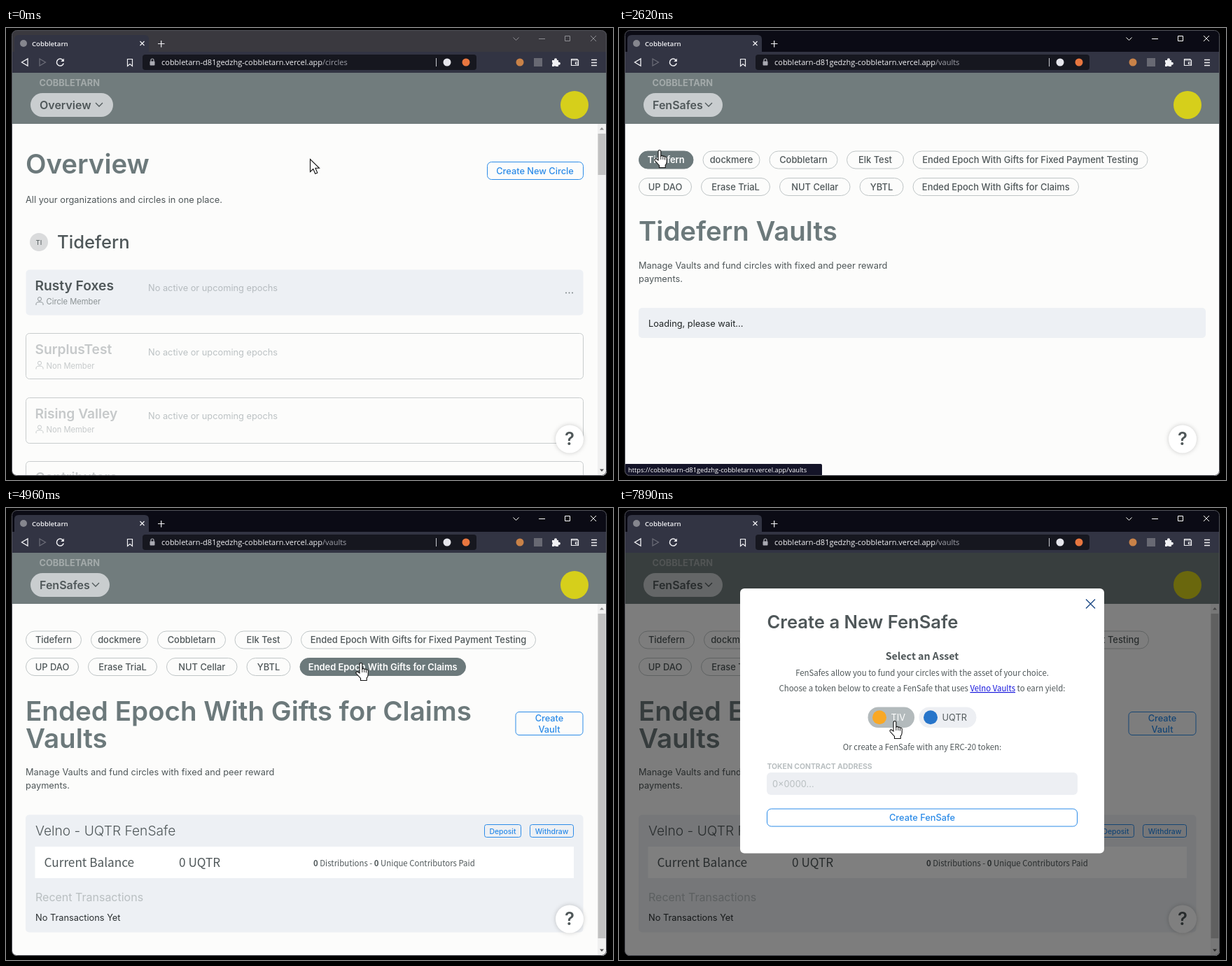
An HTML page for the animation above (8000 ms loop, 867 by 646 pixels).

```html
<!DOCTYPE html>
<html lang="en">
<head>
<meta charset="utf-8">
<title>Vault walkthrough</title>
<style>
  html, body { margin: 0; width: 100%; height: 100%; overflow: hidden; background: #000; }
  svg { display: block; width: 867px; height: 646px; font-optical-sizing: none; }
  text { font-family: Inter, sans-serif; white-space: pre; }
  .ui { font-family: "Open Sans", sans-serif; }
  .sans { font-family: "Noto Sans CJK SC", "Noto Sans CJK JP", "Noto Sans CJK", "Open Sans", sans-serif; }
  .mid { text-anchor: middle; }
  .menu { filter: drop-shadow(0 0 28px rgba(0, 0, 0, .3)); }
  .help { filter: drop-shadow(0 0 3px rgba(0, 0, 0, .2)); }
</style>
</head>
<body>
<svg id="stage" viewBox="0 0 867 646"></svg>
<script>
const LOOP = 8000;
const INK = '#4f5759', SLATE = '#6c797b', PALE = '#b9bfc1', BLUE = '#2b8be8', PANEL = '#edf0f4', PAGE = '#fcfcfb';
const HOST = 'cobbletarn-d81gedzhg-cobbletarn.vercel.app';

// time, x, y, hand pointer
const CURSOR = [
  [0, 434, 187], [290, 434, 188], [570, 434, 189], [1150, 167, 120], [1440, 119, 104, 1],
  [2020, 49, 175, 1], [2320, 49, 174, 1], [2620, 49, 174, 1], [2910, 206, 183], [3210, 370, 222, 1],
  [3510, 489, 232, 1], [3810, 491, 228, 1], [4090, 493, 225, 1], [4680, 493, 225, 1],
  [4960, 498, 221, 1], [5260, 556, 262], [5560, 757, 307, 1], [5840, 766, 311, 1],
  [6150, 765, 306, 1], [6430, 769, 306], [6730, 769, 306], [7010, 685, 312],
  [7310, 385, 304, 1], [7610, 385, 304, 1], [7890, 385, 304, 1]
];

const MENU = [
  ['TIDEFERN', 'Rusty Foxes'], ['DOCKMERE', 'dockmere'], ['COBBLETARN', 'Community', 'Core'],
  ['ELK TEST', 'Elks', 'Circle 2', 'Test'],
  ['ENDED EPOCH WITH GIFTS FOR FIXED PAYMENT TESTING', 'Basketry'], ['UP DAO', 'Quiet Maple Capital']
];

const text = (x, y, s, size = 12.8, fill = INK, weight = 400, cls = '') =>
  `<text x="${x}" y="${y}" font-size="${size}" fill="${fill}" font-weight="${weight}" class="${cls}">${s}</text>`;
const rect = (x, y, w, h, r = 0, fill = 'none', stroke = 'none') =>
  `<rect x="${x}" y="${y}" width="${w}" height="${h}" rx="${r}" fill="${fill}" stroke="${stroke}"/>`;
const circle = (x, y, r, fill) => `<circle cx="${x}" cy="${y}" r="${r}" fill="${fill}"/>`;
const path = (d, stroke, width = 1, fill = 'none') =>
  `<path d="${d}" stroke="${stroke}" stroke-width="${width}" fill="${fill}"/>`;
const group = (cls, content) => `<g class="${cls}">${content}</g>`;

function scrollbar(x, top, thumbTop, thumbEnd) {
  return rect(x, top, 13, 640 - top, 0, '#f0f0f0') + rect(x + .5, thumbTop, 11, thumbEnd - thumbTop, 0, '#c1c1c1') +
    path(`M${x + 3} ${top + 8.5}l3-3.5 3 3.5z`, 'none', 0, '#8b8b8b') +
    path(`M${x + 3} 630.5l3 3.5 3-3.5z`, 'none', 0, '#505050');
}

function chrome(focused, route) {
  const ctl = focused ? '#fff' : '#8e8e93', white = '#f1f1f4';
  return rect(8, 3, 850, 31, 0, focused ? '#0b0b15' : '#3a393f') +
    path('M12 35V16q0-6 6-6H198q6 0 6 6V35z', 'none', 0, '#323443') + rect(8, 34, 850, 30, 0, '#323443') +
    circle(25, 22, 5, '#85868e') + text(37, 26, 'Cobbletarn', 9.6, white, 600, 'ui') +
    path('M191.5 19l6 6m0-6l-6 6M217 22.5h9.5M221.7 18v9.5', white, 1.2) +
    path('M724.5 13.500l4 4 4-4M761 15.500h9M798.500 11.500h7v7h-7zM835 11l8 8m0-8l-8 8', ctl) +
    path('M31 44v10l-8.5-5z', white, 1.3) + path('M48 44v10l8.5-5z', '#6d6e79', 1.2) +
    path('M81.5 46.2a5 5 0 1 0 .7 4.3', white, 1.5) + path('M82.8 43.5v4.5h-4.5z', 'none', 0, white) +
    path('M173.5 44.5h7v10l-3.5-3-3.5 3z', white, 1.2) +
    rect(195, 38, 477, 22, 4, '#16171f') +
    rect(205.5, 47.5, 7, 6, 1, '#a9aab2') + path('M207 48v-2a2 2 0 0 1 4 0v2', '#a9aab2', 1.2) +
    text(222, 53, `${HOST}<tspan fill="#a0a1aa">${route}</tspan>`, 11, white, 400, 'ui') +
    path('M614.5 43v12', '#c9c9d0') + circle(630, 49, 5.5, '#e6e6ec') + circle(657, 49, 5.5, '#e8763f') +
    circle(734, 49, 5.5, '#c98248') + rect(754, 43, 12, 12, 0, '#686973') +
    path('M780 46h3.2a2 2 0 1 1 3.6 0H789v3a2 2 0 1 1 0 3.6V55h-3.5a1.800 1.800 0 0 0-3 0H780v-3a1.800 1.800 0 0 0 0-3z', 'none', 0, white) +
    path('M816 46v-1.5h-8.5v9h10v-7.5h-10M817.5 49h-4v2.5h4', white, 1.2) +
    path('M836 45.5h8M836 49.5h8M836 53.5h8', white, 1.3);
}

function header(label, labelWidth, inset) {
  const chevron = 48 + labelWidth + 5;
  return rect(8, 64, 850 - inset, 73, 0, '#717c7d') +
    text(47.5, 83, 'COBBLETARN', 12.8, '#a3aaaa', 700) +
    rect(35, 93, labelWidth + 43, 34, 17, '#c9cdcf') + text(48, 115.5, label, 16, INK, 600) +
    path(`M${chevron} 107l5 5 5-5`, INK, 1.3) + circle(812 - inset, 110, 20, '#d6cf1b');
}

const help = inset => group('help', circle(805 - inset, 587.5, 20, '#fff')) +
  text(805 - inset, 596, '?', 25.6, INK, 600, 'mid');

function circleCard(i, name, inset) {
  const y = 345 + i * 91.6, first = i === 0, tone = first ? '#8b9294' : '#c6cacb';
  return rect(28.5, Math.floor(y) + .5, 796 - inset, 65, 5, first ? PANEL : 'none', first ? 'none' : '#c8cccd') +
    text(41.5, y + 29.5, name, 19.2, first ? INK : '#c6c9ca', 600) +
    path(`M43 ${y + 51}v-1.5q0-3 5-3t5 3V${y + 51}`, tone) +
    `<circle cx="48" cy="${y + 42.3}" r="2.6" fill="none" stroke="${tone}"/>` +
    text(57.5, y + 50, first ? 'Circle Member' : 'Non Member', 11.2, tone) +
    text(203 - inset * .2, y + 31, 'No active or upcoming epochs', 12.8, first ? '#b5bbbf' : '#bcc2c4') +
    (first ? [0, 4.5, 9].map(dx => circle(800 - inset + dx, y + 33.5, 1, '#7b8587')).join('') : '');
}

function overviewPage(inset) {
  return rect(8, 64, 850, 576, 0, PAGE) + header('Overview', 75, inset) +
    text(28, 208, 'Overview', 38.4, SLATE, 600) +
    rect(687.5 - inset, 191.5, 137, 25, 6, 'none', BLUE) +
    text(755.5 - inset, 208.5, 'Create New Circle', 12.8, BLUE, 500, 'mid') +
    text(28, 250, 'All your organizations and circles in one place.') +
    circle(47, 306, 13, '#dadbdc') + text(47, 309.5, 'TI', 9.6, INK, 400, 'mid') +
    text(73, 315, 'Tidefern', 25.6, INK, 500) +
    ['Rusty Foxes', 'SurplusTest', 'Rising Valley', 'Contributors'].map((n, i) => circleCard(i, n, inset)).join('') +
    help(inset) + scrollbar(845 - inset, 137, 151, 210) + (inset ? scrollbar(845, 64, 78, 467) : '');
}

function menu(t) {
  let y = 199;
  const sections = MENU.map(([title, ...items]) => {
    const part = path(`M48 ${Math.floor(y) + .5}H344`, '#d9dcdd') + text(48, y + 17.8, title, 10.4, PALE, 700) +
      items.map((s, i) => text(48, y + 42 + i * 26.4, s, 16)).join('');
    y += 59.6 + 26.4 * (items.length - 1);
    return part;
  });
  const late = t >= 2320;
  return group('menu', rect(35, 81, 322, 620, 6, '#fff')) +
    text(48, 115.5, 'Overview', 16, INK, 600) + path('M127.5 113l5-5 5 5', INK, 1.3) +
    text(48, 154.8, 'Overview', 16, t >= 2020 && !late ? BLUE : INK) +
    text(48, 181.3, 'FenSafes', 16, late ? BLUE : INK) + sections.join('') + path('M48 635.5H344', '#d9dcdd');
}

function pill(label, x, y, width, active) {
  return rect(x + .5, y, width - 1, 25, 12.5, active ? SLATE : 'none', active ? SLATE : '#bfc5c6') +
    text(x + width / 2, y + 17.3, label, 12.9, active ? '#fff' : INK, active ? 600 : 500, 'mid');
}

function pills(t, loaded) {
  const dx = loaded ? 1.5 : 0, claims = 'Ended Epoch With Gifts for Claims';
  return pill('Tidefern', 28, 176, 78.5 + dx, !loaded) +
    pill('dockmere', 119.5 + dx, 176, 82) + pill('Cobbletarn', 214.5 + dx, 176, 98) +
    pill('Elk Test', 325 + dx, 176, 82) +
    pill('Ended Epoch With Gifts for Fixed Payment Testing', 419.5 + dx, 176, 336) +
    pill('UP DAO', 28, 214.5, 76) + pill('Erase TriaL', 117, 214.5, 99) +
    pill('NUT Cellar', 229, 214.5, 101.5) + pill('YBTL', 343.5, 214.5, 63, t >= 3210 && t < 3510) +
    pill(claims, 419.5, 214.5, t < 6430 ? 237.5 : 236, t >= 3510);
}

const blurb = y => text(28, y, 'Manage Vaults and fund circles with fixed and peer reward') + text(28, y + 19.2, 'payments.');

function smallButton(label, x, width) {
  return rect(x + .5, 452.5, width - 1, 18, 3, 'none', BLUE) +
    text(x + width / 2, 465.5, label, 10.4, BLUE, 500, 'mid');
}

function vaultCard(t) {
  const solid = t >= 5560 && t < 6730, ink = solid ? '#fff' : BLUE, weight = solid ? 600 : 500;
  return text(28, 304, 'Ended Epoch With Gifts for Claims', 38.6, SLATE, 600) +
    text(28, 342.5, 'Vaults', 38.6, SLATE, 600) + blurb(382) +
    rect(728, 291.5, 96, 33, 5, solid ? '#2b90f0' : 'none', BLUE) +
    text(776, 304.5, 'Create', 12.8, ink, weight, 'mid') + text(776, 320.5, 'Vault', 12.8, ink, weight, 'mid') +
    rect(28, 438.5, 796.5, 168, 5, PANEL) + text(42, 468, 'Velno - UQTR FenSafe', 19.2, INK, 300) +
    (t >= 4960 ? smallButton('Deposit', 683, 53) + smallButton('Withdraw', 748, 63) : '') +
    rect(41.5, 484, 769.5, 45, 0, '#fff') + text(54.5, 513, 'Current Balance', 17.2, INK, 400, 'sans') +
    text(247, 513, '0 UQTR', 17.2, INK, 400, 'sans') +
    text(439, 511.5, '<tspan font-weight="700">0</tspan> Distributions - <tspan font-weight="700">0</tspan> Unique Contributors Paid', 11.4, INK, 400, 'sans') +
    text(42, 562, 'Recent Transactions', 16, PALE) + text(42, 590, 'No Transactions Yet', 12.8, '#2a2f31') +
    scrollbar(845, 137, 151, 615);
}

function vaultsPage(t) {
  const loaded = t >= 4680;
  return rect(8, 64, 850, 576, 0, PAGE) + header('FenSafes', 70, 0) + pills(t, loaded) +
    (loaded ? vaultCard(t) :
      text(28, 304, 'Tidefern Vaults', 38.4, SLATE, 600) + blurb(344) +
      rect(28, 400, 810, 43, 5, PANEL) + text(42, 426.5, 'Loading, please wait...', 12.8, '#1f2425')) +
    help(0) +
    (t < 3210 ? `<g opacity="${t < 2910 ? 1 : .5}">` + rect(8, 623, 282, 18, 2, '#141428') +
      text(13, 635, `https://${HOST}/vaults`, 9.3, '#fff', 400, 'ui') + '</g>' : '');
}

function asset(label, x, width, color, fill = '#edeff3', ink = '#555d5f') {
  return rect(x, 284.5, width, 29.5, 14.75, fill) + circle(x + 16.5, 299.3, 10, color) +
    text(x + 33, 304, label, 12.8, ink);
}

function dialog(t) {
  const ready = t >= 7890, line = ready ? BLUE : '#9dd0f8';
  const hover = t >= 7610 ? ['#b3babc', '#fff'] : t >= 7310 ? ['#cfd4d7', '#fff'] : [];
  const row = (y, s) => text(433, y, s, 11.4, INK, 400, 'sans mid');
  return rect(8, 64, 850, 576, 0, '#00000080') + rect(173, 115, 520, 378.5, 6, '#fff') +
    path('M667 130.5l13 13m0-13l-13 13', ready ? '#1d4a86' : INK, 1.4) +
    text(211.5, 172, 'Create a New FenSafe', 25.6, INK, 600) +
    text(433, 216.5, 'Select an Asset', 14.2, INK, 600, 'sans mid') +
    row(240, 'FenSafes allow you to fund your circles with the asset of your choice.') +
    row(262, 'Choose a token below to create a FenSafe that uses <tspan fill="#1414dc" text-decoration="underline">Velno Vaults</tspan> to earn yield:') +
    asset('TIV', 355.5, 66.5, '#f9a825', ...hover) + asset('UQTR', 428.5, 82, '#2775ca') +
    row(346, 'Or create a FenSafe with any ERC-20 token:') +
    text(211.5, 373, 'TOKEN CONTRACT ADDRESS', 10.4, PALE, 700) +
    rect(211, 378, 444, 32, 6, '#edeff3') + text(219, 399, '0×0000...', 12.8, PALE) +
    rect(211.5, 430, 443, 25, 6, '#fff', line) + text(433, 447.2, 'Create FenSafe', 12.8, line, 500, 'mid');
}

function pointer([, x, y, hand]) {
  const d = hand
    ? 'M6 15V2.4a1.9 1.9 0 0 1 3.8 0V9q1.6-1.4 3 .4 1.5-.9 2.6.7 2-.6 2.8 1.3V17q0 3-2 5v3.5H7.5V22.5L1.2 15.5q-.9-1.6.6-2.5 1.4-.5 2.6.9z'
    : 'M.5.5V18.5L4.8 14.5 7.7 21.2 10.8 19.9 7.9 13.3H13.5z';
  return `<g transform="translate(${hand ? x + 1 : x} ${y})">${path(d, '#111', 1.1, '#fff')}` +
    (hand ? path('M9.8 9v5M12.8 10v4M15.5 11v3.5', '#111', .9) : '') + '</g>';
}

function scene(step) {
  const t = step[0], onVaults = t >= 2620, menuOpen = t >= 1440 && !onVaults;
  return '<clipPath id="frame"><rect x="8.5" y="3.5" width="849.5" height="636.5" rx="7"/></clipPath>' +
    '<g clip-path="url(#frame)">' +
    (onVaults ? vaultsPage(t) : overviewPage(menuOpen ? 14 : 0)) + (menuOpen ? menu(t) : '') +
    (t >= 6730 ? dialog(t) : '') + chrome(onVaults, onVaults ? '/vaults' : '/circles') + '</g>' +
    rect(8.5, 3.5, 849, 636, 7, 'none', '#54555c') + pointer(step);
}

const stage = document.getElementById('stage');
let shown;
function draw(now) {
  const t = now % LOOP, step = CURSOR.findLast(c => c[0] <= t) || CURSOR[0];
  if (step !== shown) stage.innerHTML = scene(shown = step);
  requestAnimationFrame(draw);
}
draw(performance.now());
</script>
</body>
</html>
```
